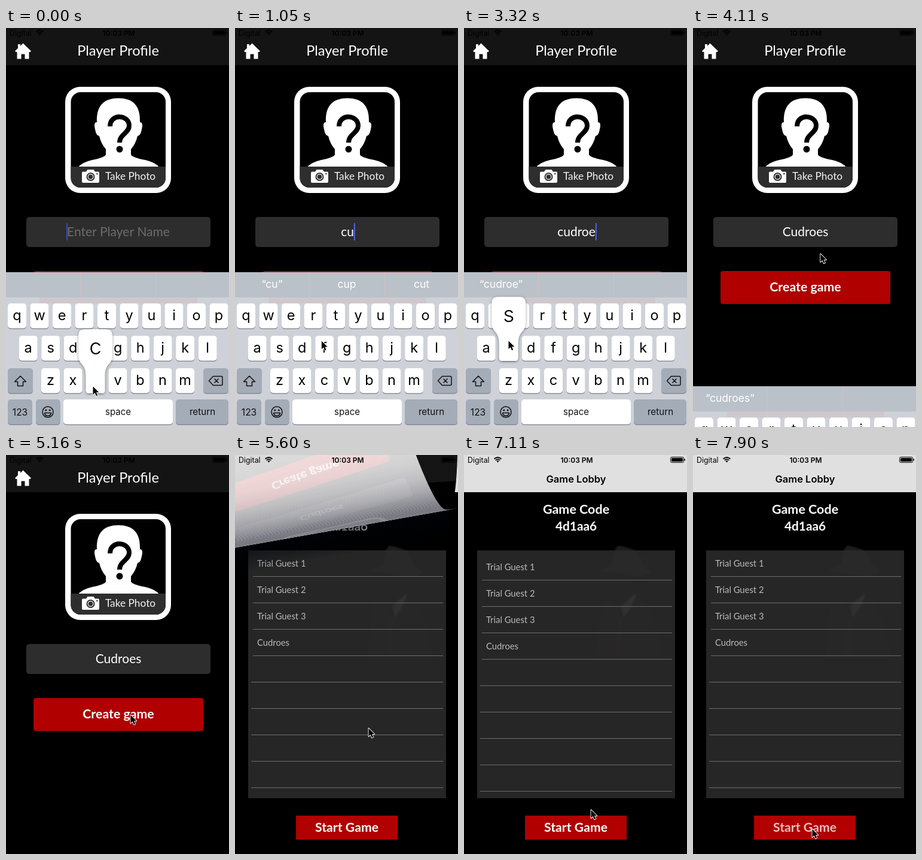
Recreate the animation shown at these times as an HTML page with a canvas. Size 373x665 px, loop 7.99 s.

```html
<!DOCTYPE html>
<html lang="en">
<head>
<meta charset="utf-8">
<title>Player profile to game lobby</title>
<style>
html, body { margin: 0; width: 100%; height: 100%; overflow: hidden; background: #000; }
canvas { display: block; width: 373px; height: 665px; }
</style>
</head>
<body>
<canvas id="stage"></canvas>
<script>
const W = 373, H = 665, LOOP = 7990;
const RED = '#b00000';
const NAME = 'cudroes';

function makeContext(canvas) {
  const scale = window.devicePixelRatio || 1;
  canvas.width = W * scale;
  canvas.height = H * scale;
  const context = canvas.getContext('2d');
  context.scale(scale, scale);
  return context;
}
const screen2d = makeContext(document.getElementById('stage'));
const page2d = makeContext(document.createElement('canvas'));
let g = screen2d;

// ---- helpers ----
const clamp = v => Math.max(0, Math.min(1, v));
const progress = (t, from, to) => clamp((t - from) / (to - from));
const smooth = k => k * k * (3 - 2 * k);
const mix = (a, b, k) => a + (b - a) * k;
const lato = (size, weight = 400) => `${weight} ${size}px Lato, sans-serif`;
const inter = (size, weight = 400) => `${weight} ${size}px Inter, sans-serif`;

function rect(x, y, w, h, color) {
  g.fillStyle = color;
  g.fillRect(x, y, w, h);
}
function round(x, y, w, h, r, color) {
  g.fillStyle = color;
  g.beginPath();
  g.roundRect(x, y, w, h, r);
  g.fill();
}
function circle(x, y, r, color) {
  g.fillStyle = color;
  g.beginPath();
  g.arc(x, y, r, 0, 7);
  g.fill();
}
function shape(d, color) {
  g.fillStyle = color;
  g.fill(new Path2D(d), 'evenodd');
}
function line(d, color, width = 1.5) {
  g.strokeStyle = color;
  g.lineWidth = width;
  g.lineJoin = 'round';
  g.stroke(new Path2D(d));
}
function text(str, x, y, font, color = '#fff', align = 'center') {
  g.font = font;
  g.fillStyle = color;
  g.textAlign = align;
  g.fillText(str, x, y);
}

// ---- keyboard ----
const keys = {};
['qwertyuiop', 'asdfghjkl', 'zxcvbnm'].forEach((row, r) => {
  [...row].forEach((letter, i) => {
    keys[letter] = { x: [18.5, 37.2, 74.5][r] + i * 37.5, y: 459 + r * 54 };
  });
});

// One press per letter of the name: [finger down, finger up]
const presses = [[-100, 130], [560, 710], [1230, 1400], [1740, 1960],
                 [2420, 2580], [2840, 2980], [3230, 3430]];
const suggestions = [[], ['can', 'check'], ['cup', 'cut'], ['Cudroella', 'change'],
                     ['Cudroella', 'change'], [], [], []];
const typedCount = t => presses.filter(p => t >= p[1] - 60).length;

function keyCap(x, y, w, color = '#fff') {
  round(x, y + 1, w, 42, 5, '#8a8d93');
  round(x, y, w, 41.5, 5, color);
}

function popup(letter) {
  const { x, y } = keys[letter];
  const L = x - 28.5, R = x + 28.5, T = y - 65, B = y + 42;
  g.save();
  g.shadowColor = 'rgba(0,0,0,.4)';
  g.shadowBlur = 4;
  g.shadowOffsetY = 1;
  shape(`M${L + 11} ${T}H${R - 11}Q${R} ${T} ${R} ${T + 11}V${y - 22}
    C${R} ${y - 5} ${x + 16} ${y - 9} ${x + 16} ${y + 13}V${B - 5}
    Q${x + 16} ${B} ${x + 11} ${B}H${x - 11}Q${x - 16} ${B} ${x - 16} ${B - 5}V${y + 13}
    C${x - 16} ${y - 9} ${L} ${y - 5} ${L} ${y - 22}V${T + 11}Q${L} ${T} ${L + 11} ${T}Z`, '#fff');
  g.restore();
  text(letter, x, y - 23, inter(37, 300), '#000');
}

function keyboard(t) {
  const gray = '#a4acb8', ink = '#111';
  g.save();
  g.translate(0, 260 * smooth(progress(t, 3880, 4230)));
  rect(0, 407, W, 258, '#ced2d8');
  rect(0, 407, W, 42, '#bac1c9');
  rect(56, 449, 264, 10, 'rgba(200,120,120,.12)');
  rect(124, 407, 1, 42, '#d3bfc2');
  rect(250, 407, 1, 42, '#d3bfc2');

  const shown = typedCount(t - 90);
  if (shown) {
    text(`“${NAME.slice(0, Math.min(shown, t < 1960 ? 3 : 7))}”`, 62, 433, inter(17.5));
    suggestions[shown].forEach((word, i) => text(word, 187 + i * 125, 433, inter(17.5)));
  }

  for (const [letter, { x, y }] of Object.entries(keys)) {
    keyCap(x - 15.5, y, 31, '#fff');
    text(letter, x, y + 28, inter(23.5), '#000');
  }
  keyCap(3, 567, 42, gray);
  keyCap(330, 567, 42, gray);
  keyCap(3, 619, 41, gray);
  keyCap(50, 619, 40.5, gray);
  keyCap(96, 619, 183, '#fff');
  keyCap(284, 619, 88, gray);
  text('123', 23.5, 646, inter(15.5), ink);
  text('space', 187.5, 645, inter(15), ink);
  text('return', 328.5, 645, inter(15.2), ink);
  line('M24 580L33.5 589.5H28.5V596.5H19.5V589.5H14.5Z', ink);
  line('M346.500 580.500H360Q362 580.500 362 582.500V593.500Q362 595.500 360 595.500H346.500L339.500 588ZM348.500 584.500L355.500 591.500M355.500 584.500L348.500 591.500', ink);
  line('M61 640a9 9 0 1 0 18 0a9 9 0 1 0 -18 0M64.500 641.500H75.500Q74.500 646.500 70 646.500T64.500 641.500Z', ink);
  circle(66.8, 637, 1.5, ink);
  circle(73.2, 637, 1.5, ink);

  presses.forEach(([down, up], i) => {
    if (t >= down && t < up) popup(NAME[i]);
  });
  g.restore();
}

// ---- profile page ----
function avatar() {
  round(99, 98, 177, 177, 25, '#fff');
  g.save();
  g.beginPath();
  g.roundRect(108.5, 107, 158.5, 159, 16);
  g.clip();
  rect(108, 107, 160, 160, '#000');
  shape(`M188 117C213 117 225 130 224 157Q230 157 227 169Q225 180 220 180Q217 193 209 202
    V211Q211 216 233 220Q251 224 257 233H120Q126 224 144 220Q165 216 167 211V202
    Q159 193 156 180Q151 180 149 169Q146 157 152 157C151 130 163 117 188 117Z`, '#fff');
  line('M174 164C174 142 206 144 206 163C206 175 190 177 190 191', '#000', 8);
  circle(190, 202, 5.5, '#000');
  rect(108, 231, 160, 36, '#2e2e2e');
  g.restore();
  shape('M129 239.500H134L136.500 236H146.500L149 239.500H154Q156 239.500 156 241.500V256Q156 258 154 258H129Q127 258 127 256V241.500Q127 239.500 129 239.500Z', '#fff');
  circle(141.5, 248, 7, '#2e2e2e');
  circle(141.5, 248, 5, '#fff');
  circle(141.5, 248, 3.8, '#2e2e2e');
  circle(152.3, 243, 1.2, '#2e2e2e');
  text('Take Photo', 208, 253, lato(17.3), '#f4f4f4');
}

function nameField(t) {
  round(34, 315, 308, 50, 5, '#2d2d2d');
  const count = typedCount(t), editing = t < 3880;
  let value = NAME.slice(0, count);
  if (!editing) value = value[0].toUpperCase() + value.slice(1);
  const font = lato(21);
  text(value || 'Enter Player Name', 188, 347, font, value ? '#fff' : '#6c6c6c');
  if (!editing) return;
  const half = g.measureText(value || 'Enter Player Name').width / 2;
  const x = value ? 188 + half : 188 - half - 1;
  rect(x, 325, 2, 29, value ? '#4a66e8' : '#3c4fb4');
}

function profile(t) {
  rect(0, 0, W, H, '#000');
  rect(0, 0, W, 62, '#141414');
  text('Player Profile', 187.5, 46, lato(23.6));
  shape('M28.500 25.500L42 38.500L40.500 40H38.500V51.500H31.500V43.500H25.500V51.500H18.500V40H16.500L15 38.500L20 33.500V27H24V30Z', '#fff');
  avatar();
  nameField(t);
  round(46, 405, 284, 55, 4, RED);
  text('Create game', 188, 439, lato(21.3, 700));
  if (t < 4230) keyboard(t);
}

// ---- lobby page ----
function hatMan() {
  g.save();
  g.filter = 'blur(1px)';
  shape('M224 194Q238 186 248 183Q250 154 259 151Q269 153 281 157Q296 162 298 184Q309 188 312 197Q294 206 268 199Q240 194 224 194Z', '#1c1c1c');
  shape('M240 236Q225 252 222 340H330Q322 262 288 232L266 272Z', 'rgba(20,20,20,.5)');
  const collar = g.createLinearGradient(262, 0, 288, 0);
  collar.addColorStop(0, '#555');
  collar.addColorStop(1, '#777c7a');
  shape('M288 230L262 252L267 271Q284 250 288 230Z', collar);
  shape('M258 274L266 270L262 335L252 330Z', 'rgba(70,20,20,.35)');
  g.restore();
}

// Pulled down past its top, then springing back
function listOffset(t) {
  return t < 6700 ? 60 * smooth(progress(t, 5990, 6650)) : 60 * Math.exp((6700 - t) / 178);
}

function lobby(t) {
  rect(0, 0, W, H, '#000');
  rect(0, 0, W, 62, '#e0e0e0');
  text('Game Lobby', 187.5, 46, inter(16.5, 600), '#000');
  text('Game Code', 187.5, 98, lato(21.5, 700));
  text('4d1aa6', 187.5, 126, lato(20.8, 700));
  hatMan();
  g.save();
  g.beginPath();
  g.rect(22, 159, 331, 413);
  g.clip();
  rect(22, 159, 331, 413, 'rgba(43,43,43,.9)');
  g.translate(0, listOffset(t));
  const players = ['Trial Guest 1', 'Trial Guest 2', 'Trial Guest 3', 'Cudroes'];
  for (let i = 0; i < 9; i++) {
    const left = i < 4 ? 30 : 27;
    rect(left, 202 + i * 44, 348 - left, 1, '#6e6e6e');
    if (players[i]) text(players[i], 37, 186 + i * 44, lato(14.8), '#b9b9b9', 'left');
  }
  g.restore();
  rect(102, 601, 170, 40, RED);
  const label = 1 - .25 * progress(t, 7600, 7850);
  text('Start Game', 187, 628, lato(21.2, 700), `rgba(255,255,255,${label})`);
}

// ---- page curl: the page rolls up around a tilted cylinder ----
function curl(t) {
  const tilt = Math.PI / 18, r = 185, step = 3;
  const start = mix(722, -200, smooth(progress(t, 5120, 5780)));
  const end = W * Math.sin(tilt) + H * Math.cos(tilt) - start;
  const place = s => s < Math.PI * r ? r * Math.sin(s / r) : Math.PI * r - s;
  const edge = start + (end < r * Math.PI / 2 ? place(end) : r);
  g.save();
  g.rotate(-tilt);

  const shadow = g.createLinearGradient(0, edge - 10, 0, edge + 45);
  shadow.addColorStop(0, 'rgba(0,4,10,.75)');
  shadow.addColorStop(1, 'rgba(0,4,10,0)');
  rect(-200, edge - 10, W + 160, 55, shadow);

  const strip = (s, from, to, squeeze, paint) => {
    g.save();
    g.beginPath();
    g.rect(-500, Math.min(from, to) - .4, 1500, Math.abs(to - from) + .8);
    g.clip();
    g.translate(0, from);
    g.scale(1, squeeze);
    g.translate(0, -(start + s));
    g.rotate(tilt);
    paint();
    g.restore();
  };
  const front = () => g.drawImage(page2d.canvas, 0, 0, W, H);
  strip(0, -900, start, 1, () => {});
  g.save();
  g.beginPath();
  g.rect(-500, -900, 1500, 900 + start);
  g.clip();
  g.rotate(tilt);
  front();
  g.restore();

  for (let s = 0; s < end; s += step) {
    const from = start + place(s), to = start + place(s + step);
    strip(s, from, to, (to - from) / step, () => {
      if (s < r * Math.PI / 2) return front();
      rect(0, 0, W, H, '#fff');
      g.globalAlpha = .14;
      front();
      g.globalAlpha = 1;
      const shade = s < Math.PI * r ? .6 * Math.sin(s / r) ** 4 : 0;
      rect(0, 0, W, H, `rgba(8,8,28,${shade})`);
    });
  }
  g.restore();
}

// ---- overlays ----
function statusBar() {
  text('Digital', 6, 12.5, inter(12.4), '#000', 'left');
  g.lineCap = 'butt';
  line('M50.500 6.500Q56.500 1.500 62.500 6.500M52.700 8.800Q56.500 5.600 60.300 8.800', '#000', 1.7);
  shape('M54.300 10Q56.500 8.500 58.700 10L56.500 12.500Z', '#000');
  text('10:03 PM', 188.5, 12.5, inter(12, 600), '#000');
  g.lineWidth = 1;
  g.strokeStyle = '#000';
  g.beginPath();
  g.roundRect(345.5, 3.5, 22, 9, 2);
  g.stroke();
  round(347, 5, 19, 6, 1, '#000');
  rect(368.5, 6.5, 1.5, 3, '#000');
}

// time, x, y of the pointer tip
const pointerPath = [
  [0, 145, 597], [130, 145, 597], [540, 245, 480], [730, 245, 480],
  [1200, 113, 534], [1420, 113, 534], [1720, 133, 482], [1840, 133, 482],
  [1930, 157, 497], [2400, 321, 482], [2590, 321, 482], [2820, 96, 482],
  [2990, 96, 482], [3220, 74, 521], [3440, 74, 521], [3670, 213, 372],
  [4000, 213, 372], [4710, 208, 433], [5180, 208, 433], [5600, 223, 455],
  [5950, 222, 320], [6000, 222, 320], [6650, 222, 440], [6720, 222, 440],
  [7110, 212, 591], [7500, 199, 623], [LOOP, 199, 623]
];

function pointer(t) {
  const i = Math.max(1, pointerPath.findIndex(p => p[0] > t));
  const [t0, x0, y0] = pointerPath[i - 1], [t1, x1, y1] = pointerPath[i];
  const k = smooth(progress(t, t0, t1));
  g.save();
  g.translate(mix(x0, x1, k), mix(y0, y1, k));
  const arrow = 'M.500 .500V14L3.700 11L6 16.300L8.200 15.300L6 10.300H10.300Z';
  line(arrow, '#fff', 1.8);
  shape(arrow, '#000');
  g.restore();
}

function draw(t) {
  if (t < 5160) {
    profile(t);
  } else {
    lobby(t);
    if (t < 5800) {
      g = page2d;
      profile(t);
      g = screen2d;
      curl(t);
    }
  }
  statusBar();
  pointer(t);
}

const began = performance.now();
function tick() {
  draw((performance.now() - began) % LOOP);
  requestAnimationFrame(tick);
}
tick();
</script>
</body>
</html>
```
